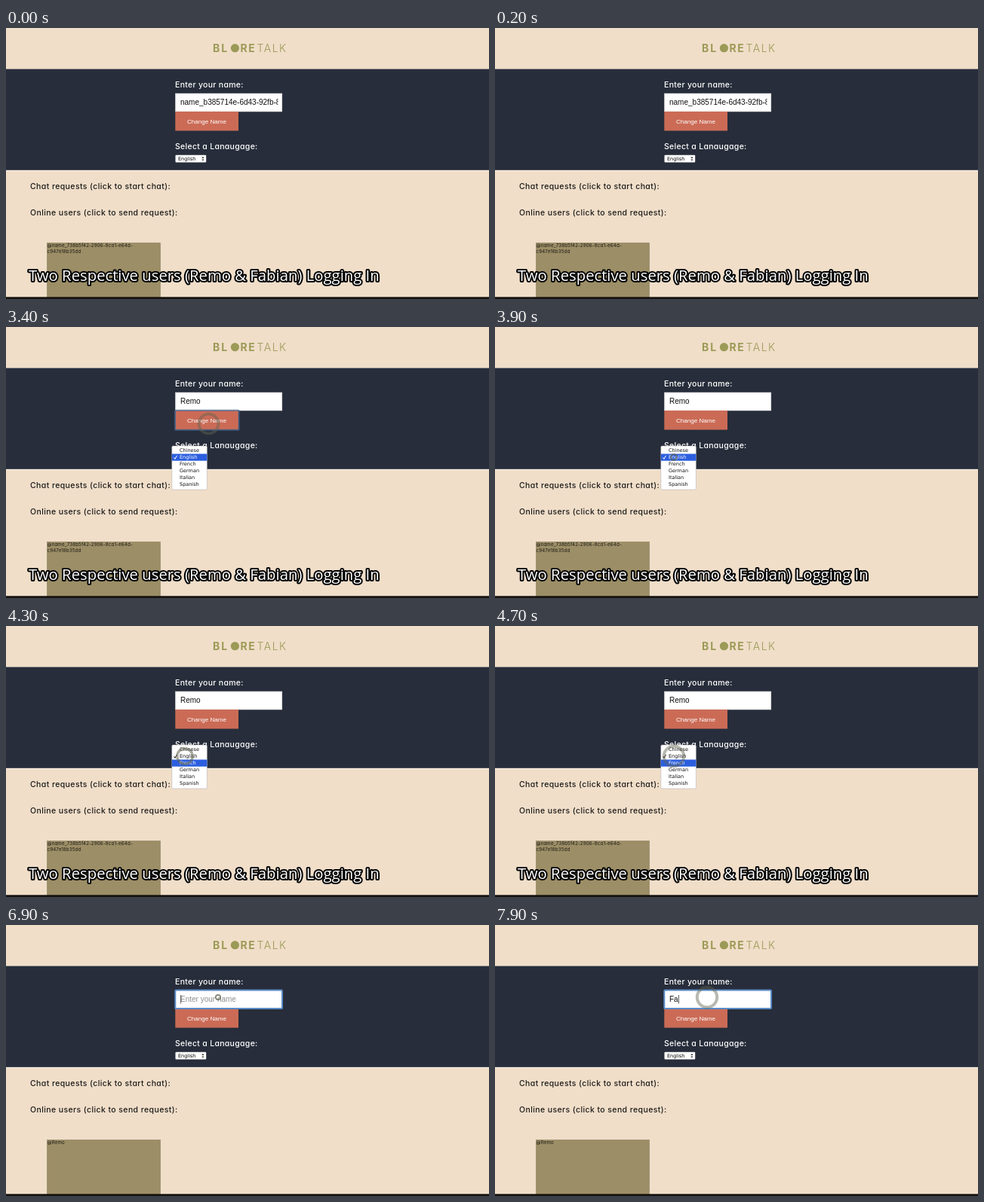
These frames come from a looping animation (640x360 px, 8000 ms). An HTML page:

```html
<!DOCTYPE html>
<html lang="en">
<head>
<meta charset="utf-8">
<title>Chat login</title>
<style>
  html, body { margin: 0; width: 100%; height: 100%; overflow: hidden; background: #f0dec9; }
  svg { display: block; width: 100vw; height: 100vh; }
  text { white-space: pre; }
  .geo { font-family: Inter, sans-serif; font-feature-settings: "cv11"; }
  .label { font-size: 10.5px; font-weight: 500; letter-spacing: .3px; }
  .wide { letter-spacing: .4px; fill: #1c1a18; }
  .tile { font-size: 6.2px; letter-spacing: .15px; fill: #1c1a14; }
  .logo { font-size: 14px; fill: #9b9a56; }
  .form { font-family: "Liberation Sans", Arial, sans-serif; font-size: 10px; }
  .menu { font-family: "DejaVu Sans", sans-serif; font-size: 6.5px; }
  .caption { font: 20.3px "Open Sans", sans-serif; fill: #fff; stroke: #000; stroke-width: 4px;
             stroke-linejoin: round; paint-order: stroke; }
</style>
</head>
<body>
<svg viewBox="0 0 640 360" preserveAspectRatio="none">
  <defs>
    <clipPath id="fieldClip"><rect x="230" y="87" width="130.5" height="24"/></clipPath>
  </defs>
  <rect width="640" height="360" fill="#f0dec9"/>
  <g class="geo logo">
    <text x="274" y="31.5" font-weight="700" letter-spacing="2">BL</text>
    <circle cx="303.4" cy="26.7" r="5.6"/>
    <text x="310.5" y="31.5" font-weight="700" letter-spacing="1.5">RE</text>
    <text x="332.5" y="31.5" font-weight="300" letter-spacing="1.5">TALK</text>
  </g>

  <rect y="54" width="640" height="136" fill="#f8efe3"/>
  <rect y="54.5" width="640" height="134.3" fill="#272d3a"/>
  <g class="geo label" fill="#fff">
    <text x="224" y="79">Enter your name:</text>
    <text x="224" y="161">Select a Lanaugage:</text>
  </g>
  <rect x="224.5" y="87" width="141.3" height="24" fill="#fff" stroke="#d5d5d5" stroke-width=".6"/>
  <text id="field" class="form" x="231" y="102" clip-path="url(#fieldClip)"></text>
  <rect id="caret" y="93" width=".8" height="11.5" fill="#333"/>

  <rect id="button" x="224.3" y="111" width="83.7" height="25.5"/>
  <text class="form" x="266" y="126.8" text-anchor="middle" fill="#fff" style="font-size:8.1px">Change Name</text>
  <g fill="none" stroke-width="2">
    <rect id="fieldFocus" x="224.3" y="86.5" width="141.7" height="24.5" rx="1" stroke="#5a8cc8"/>
    <rect id="buttonFocus" x="224" y="110.8" width="84.7" height="26" rx="1" stroke="#41658f"/>
  </g>

  <rect x="224.5" y="168.8" width="40.7" height="9.6" rx="1" fill="#fff"/>
  <text class="menu" x="228" y="176">English</text>
  <path d="M259.3 173l1.6-2.2 1.6 2.2zM259.3 174.4l1.6 2.2 1.6-2.2z" fill="#333"/>

  <g class="geo label wide">
    <text x="32" y="214">Chat requests (click to start chat):</text>
    <text x="32" y="249">Online users (click to send request):</text>
  </g>
  <rect x="54.5" y="285.5" width="150" height="80" fill="#9c8e66" stroke="#8b8060" stroke-width=".6"/>
  <g class="geo tile">
    <text id="user1" x="54.5" y="291.3"></text>
    <text id="user2" x="54.5" y="299"></text>
  </g>
  <rect y="357.3" width="640" height="2.7" fill="#15120f"/>

  <g id="menu" class="menu">
    <rect x="219.8" y="158" width="46.6" height="58" rx="1.5" fill="#fff" stroke="#aaa" stroke-width=".5"/>
    <rect id="highlight" x="219.8" width="46.6" height="9.2" fill="#2c5fdf"/>
    <path id="check" d="M222.5 173.2l1.4 2.2 2.6-4.6" fill="none"/>
  </g>
  <text id="caption" class="caption" x="30" y="336">Two Respective users (Remo &amp; Fabian) Logging In</text>
  <g id="rings" fill="none" stroke="#62644f"></g>
</svg>
<script>
const LOOP = 8000, STEP = 100, CUT = 5300;
const SVG = "http://www.w3.org/2000/svg";
const el = id => document.getElementById(id);
const clamp = v => Math.max(0, Math.min(1, v));
const smooth = v => v * v * (3 - 2 * v);
const show = (id, on) => { el(id).style.display = on ? "" : "none"; };

function add(parent, tag, attrs, text = "") {
  const node = document.createElementNS(SVG, tag);
  for (const key in attrs) node.setAttribute(key, attrs[key]);
  node.textContent = text;
  return parent.appendChild(node);
}

const items = ["Chinese", "English", "French", "German", "Italian", "Spanish"]
  .map((name, i) => add(el("menu"), "text", { x: 230, y: 166.3 + 9 * i }, name));

// Click ripples: birth time, visible interval and position
const clicks = [
  { born: 2500, from: 2700, to: 3900, x: 268.5, y: 128.5 },
  { born: 3640, from: 3700, to: 4900, x: 237, y: 173 },
  { born: 6700, from: 6700, to: 8000, x: 281, y: 96 }
].map(c => ({ ...c, node: add(el("rings"), "circle", { cx: c.x, cy: c.y }) }));

function drawRing({ born, from, to, node }, t) {
  const age = t - born, grow = smooth(clamp(age / 1000));
  node.style.display = t >= from && t < to ? "" : "none";
  node.setAttribute("r", 2 + 11.2 * grow);
  node.setAttribute("stroke-width", 1.4 + 2.6 * grow);
  node.setAttribute("opacity", (.85 - .4 * grow) * clamp((1500 - age) / 250));
}

function fieldText(t) {
  if (t < 2700) return "name_b385714e-6d43-92fb-8";
  if (t < CUT) return "Remo";
  if (t < 6800) return "name_4bc827f1-95d6-3170-";
  return "Fabian".slice(0, t < 7500 ? 0 : t < 7800 ? 1 : 2);
}

function drawField(t) {
  const value = fieldText(t), focused = t >= 6700;
  el("field").textContent = value || "Enter your name";
  el("field").setAttribute("fill", value ? "#111" : "#8f8f8f");
  show("fieldFocus", focused);
  show("caret", t >= 6800);
  el("caret").setAttribute("x", 231.3 + (value ? el("field").getComputedTextLength() : 0));
}

function drawMenu(t) {
  const selected = t < 4100 ? 1 : 2;
  show("menu", t >= 3300 && t < CUT);
  el("highlight").setAttribute("y", 159.5 + 9 * selected);
  el("check").setAttribute("stroke", selected === 1 ? "#fff" : "#111");
  items.forEach((item, i) => item.setAttribute("fill", i === selected ? "#fff" : "#111"));
}

function draw(t) {
  const secondUser = t >= CUT;
  drawField(t);
  el("button").setAttribute("fill", t >= 2700 && t < 3000 ? "#9b9a56" : "#cb6b56");
  show("buttonFocus", t >= 2700 && t < 3600);
  el("buttonFocus").setAttribute("opacity", t < 3300 ? 1 : .75);
  el("user1").textContent = secondUser ? "@Remo" : "@name_738b5f42-2906-8ca1-e64d-";
  el("user2").textContent = secondUser ? "" : "c947e18b35dd";
  drawMenu(t);
  show("caption", !secondUser);
  clicks.forEach(c => drawRing(c, t));
}

function tick() {
  draw(Math.floor(performance.now() % LOOP / STEP) * STEP);
  requestAnimationFrame(tick);
}
tick();
</script>
</body>
</html>
```
